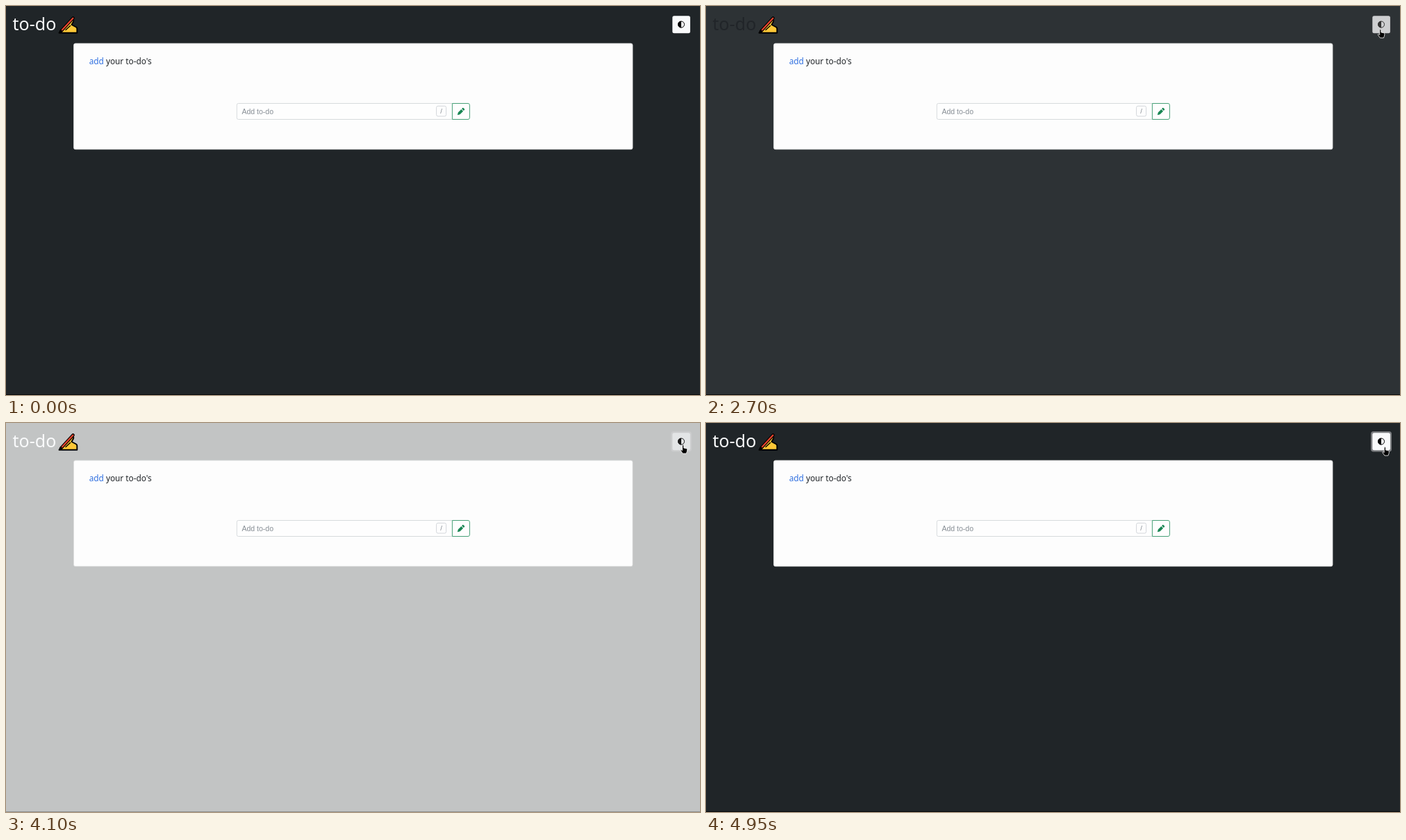
Recreate the animation shown at these times as an HTML page. Size 999 by 561 pixels, loop 5000 ms.

```html
<!DOCTYPE html>
<html lang="en">
<head>
<meta charset="utf-8">
<title>to-do</title>
<style>
html, body { margin: 0; width: 100%; height: 100%; overflow: hidden; background: #202528; }
svg { display: block; width: 999px; height: 561px; }
text { white-space: pre; }
.head { font-family: "Noto Sans", "Open Sans", sans-serif; font-weight: 500; }
.field { font-family: "Liberation Sans", Arial, sans-serif; }
</style>
</head>
<body>
<svg viewBox="0 0 999 561">
  <rect id="page" width="999" height="561"/>
  <rect id="edge" y="560" width="999" height="1" fill="#080a0b"/>

  <text id="title" class="head" x="9.6" y="34.5" font-size="25">to-do</text>
  <g stroke="#000" stroke-linejoin="round" stroke-linecap="round">
    <path d="M76.5 38.7L89 25L95.5 19.5Q98 20 97 22.5L94.5 27L101 30.5Q102.3 31.3 102.3 33V38.7Z" fill="#fcc737" stroke-width="1.9"/>
    <path d="M79 36.5L96.5 17.5" stroke-width="4.6"/>
    <path d="M81 34.3L96.3 17.7" stroke="#e5432e" stroke-width="2.3"/>
    <path d="M86 34.5L92.5 28.5" stroke-width="1.4"/>
  </g>

  <rect id="ring" x="957" y="12" width="30" height="29.5" rx="4"/>
  <rect id="toggle" x="959.3" y="14.3" width="25.6" height="25" rx="2.5"/>
  <g id="icon">
    <circle cx="972" cy="26.6" r="4.5" fill="none" stroke="currentColor"/>
    <path d="M972 21.8a4.8 4.8 0 0 0 0 9.6z" fill="currentColor"/>
  </g>

  <rect x="97.5" y="54" width="804.5" height="152.7" rx="2.5" fill="#fdfdfd" stroke="#dcdddd" stroke-width=".8"/>
  <text class="head" x="119.7" y="84.2" font-size="11.8" fill="#212529"><tspan fill="#2f6fe0">add</tspan> your to-do's</text>

  <path d="M642 140.5H334.5Q332.3 140.5 332.3 142.7V161.3Q332.3 163.5 334.5 163.5H642" fill="#fefefe" stroke="#d3d7da" stroke-width=".9"/>
  <text class="field" x="339.5" y="156.2" font-size="10.5" fill="#868d94">Add to-do</text>
  <rect x="619.6" y="144.3" width="14" height="14.7" rx="2.2" fill="#fefefe" stroke="#ced2d6" stroke-width=".9"/>
  <text class="field" x="626.6" y="155.3" font-size="9.5" text-anchor="middle" fill="#7c838a">/</text>

  <path d="M642.4 140.5H665Q667.4 140.5 667.4 142.8V161.2Q667.4 163.5 665 163.5H642.4Z" fill="#fefefe" stroke="#47a077"/>
  <path d="M649.8 157.2L650.8 153.4L655.3 148.9L658.1 151.7L653.6 156.2ZM656 148.2L657.2 147Q657.8 146.6 658.4 147L660 148.6Q660.4 149.2 660 149.8L658.8 151Z" fill="#198754"/>

  <g id="cursor" fill="#000" stroke="#fff" stroke-width=".8" stroke-linejoin="round">
    <path id="arrow" d="M0 0V9.6L2.2 7.7L3.8 11L5.4 10.3L3.9 7.1H6.8Z"/>
    <path id="hand" d="M-1.1 1Q-1.1 -.4 0 -.4T1.1 1V4L4.8 4.8Q6.2 5.2 6.1 6.7L5.6 9.5L4.6 12H-.4L-3.4 7.8Q-3.8 6.5 -2.6 6.6L-1.1 7.6Z"/>
  </g>
</svg>
<script>
const LOOP = 5000, FADE = 372, LIGHT_AT = 2679, DARK_AT = 4002;
const DARK = [32, 37, 40], PALE = [253, 253, 253];
const INK = [33, 37, 41], WHITE = [249, 250, 251];

// time, x, y of the pointer tip
const PATH = [
  [1650, 936, 148], [2150, 970.8, 34], [2700, 970.8, 34], [2850, 965.6, 52.6],
  [3200, 966.5, 50], [3350, 968.2, 44], [3750, 974.6, 32], [4130, 974.6, 32],
  [4300, 971, 44.4], [4550, 971.5, 44.4], [4850, 977.3, 35], [5000, 977.3, 35]
];

const $ = id => document.getElementById(id);
const clamp = v => Math.max(0, Math.min(1, v));
const ease = v => v * v * (3 - 2 * v);
const set = (id, key, value) => $(id).setAttribute(key, value);
const mix = (a, b, k) => `rgb(${a.map((v, i) => Math.round(v + (b[i] - v) * k))})`;

// 0 = dark theme, 1 = light theme
const theme = (t, span) => clamp((t - LIGHT_AT) / span) - clamp((t - DARK_AT) / span);

function pointer(t) {
  const i = PATH.findIndex(p => p[0] > t);
  if (i < 1) return null;
  const [t0, x0, y0] = PATH[i - 1], [t1, x1, y1] = PATH[i];
  const k = ease((t - t0) / (t1 - t0));
  return [x0 + (x1 - x0) * k, y0 + (y1 - y0) * k];
}

function draw(t) {
  const light = t >= LIGHT_AT && t < DARK_AT;
  const level = theme(t, FADE), button = theme(t, 110);

  set('page', 'fill', mix(DARK, PALE, level));
  set('edge', 'opacity', 1 - level);
  set('title', 'fill', mix(light ? INK : WHITE, INK, 0));
  set('toggle', 'fill', mix(WHITE, INK, button));
  set('icon', 'color', mix([0, 0, 0], [255, 255, 255], button));
  set('ring', 'fill', light ? 'rgb(66,70,73)' : 'rgb(211,212,213)');
  set('ring', 'opacity', 0.5 * clamp((t - LIGHT_AT) / 110));

  const at = pointer(t);
  set('cursor', 'visibility', at ? 'visible' : 'hidden');
  if (!at) return;
  const over = at[0] > 958 && at[1] < 40;
  set('cursor', 'transform', `translate(${at[0].toFixed(2)} ${at[1].toFixed(2)})`);
  set('hand', 'display', over ? 'inline' : 'none');
  set('arrow', 'display', over ? 'none' : 'inline');
}

const start = performance.now();
function tick() {
  draw((performance.now() - start) % LOOP);
  requestAnimationFrame(tick);
}
tick();
</script>
</body>
</html>
```
